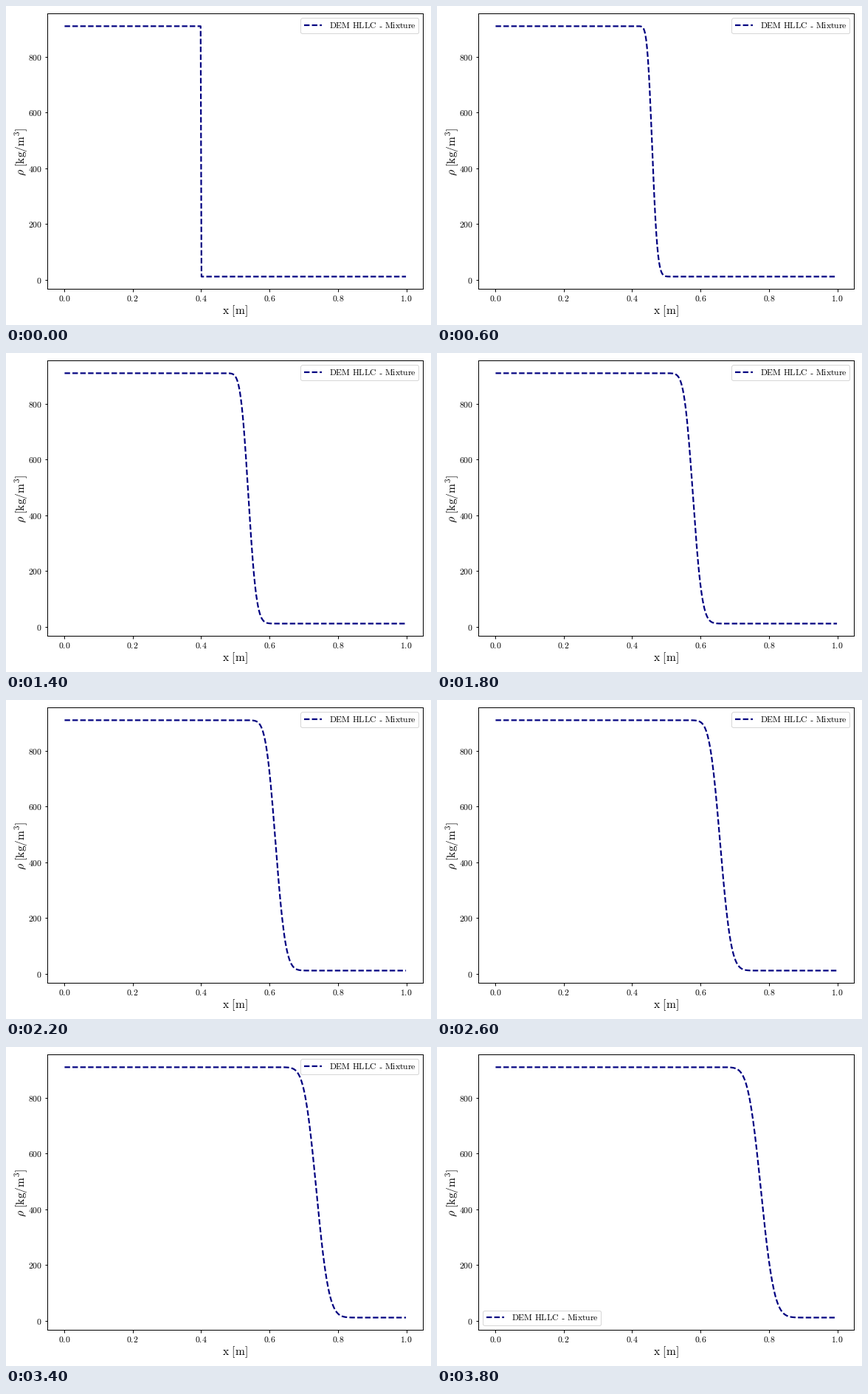
A matplotlib script that plays this animation: 576x432 px, repeating every 4000 ms.

```python
import numpy as np
import matplotlib.pyplot as plt
from matplotlib.animation import FuncAnimation
from matplotlib.lines import Line2D
from matplotlib.patches import FancyBboxPatch
from matplotlib.transforms import Affine2D

W, H, DPI = 576, 432, 72
FRAMES, INTERVAL = 20, 200
CELLS, CFL, STEPS = 400, 0.05, 159
RHO_LEFT, RHO_RIGHT = 910.0, 11.0
SMALL, LARGE = 11.75, 15.6

plt.rcParams.update({
    "mathtext.fontset": "cm",
    "axes.linewidth": 1,
    "xtick.major.width": 1,
    "ytick.major.width": 1,
    "xtick.major.pad": 2.8,
    "ytick.major.pad": 4,
})


def density_profiles():
    """Advect the density jump with a first-order upwind scheme."""
    x = (np.arange(CELLS) + 0.5) / CELLS
    rho = np.where(x < 0.4, RHO_LEFT, RHO_RIGHT)
    profiles = [rho.copy()]
    for _ in range(FRAMES - 1):
        for _ in range(STEPS):
            rho[1:] -= CFL * np.diff(rho)
        profiles.append(rho.copy())
    return x, profiles


def padded(lo, hi):
    pad = 0.05 * (hi - lo)
    return lo - pad, hi + pad


def roman(text):
    return r"$\mathrm{%s}$" % text.replace(" ", r"\ ")


x, profiles = density_profiles()
line_width = 2.2
dashed = dict(color="navy", lw=line_width,
              ls=(0, (7.4 / line_width, 3.2 / line_width)))

fig = plt.figure(figsize=(W / DPI, H / DPI), dpi=DPI, facecolor="white")
left, right, top, bottom = 56.3, 565.2, 10.4, 383.4
ax = fig.add_axes([left / W, 1 - bottom / H, (right - left) / W, (bottom - top) / H])
ax.set_xlim(padded(x[0], x[-1]))
ax.set_ylim(padded(RHO_RIGHT, RHO_LEFT))
xticks = np.arange(6) / 5
yticks = np.arange(0, 801, 200)
ax.set_xticks(xticks, [roman(f"{v:.1f}") for v in xticks], fontsize=SMALL)
ax.set_yticks(yticks, [roman(str(v)) for v in yticks], fontsize=SMALL)
curve, = ax.plot(x, profiles[0], **dashed)

# Overlay in pixel coordinates, y pointing down
page = fig.add_axes([0, 0, 1, 1], zorder=5)
page.set_xlim(0, W)
page.set_ylim(H, 0)
page.axis("off")
page.text(310.2, 413, roman("x [m]"), size=LARGE, ha="center", va="center")
page.text(20.4, 197.3, r"$\rho\ \mathrm{[kg/m^3]}$", size=LARGE,
          rotation=90, ha="center", va="center")

# Legend that can be shifted as a whole
shift = Affine2D()
moved = shift + page.transData
page.add_patch(FancyBboxPatch(
    (399.2, 16.4), 160, 20.6, boxstyle="round,pad=0,rounding_size=2.4",
    fc="white", ec="0.8", lw=1, alpha=0.8, snap=True, transform=moved))
page.add_artist(Line2D([404, 428], [25.8, 25.8], transform=moved, **dashed))
page.add_artist(Line2D([505.6, 508.8], [27.5, 27.5], color="black", lw=0.8,
                       solid_capstyle="butt", transform=moved))
for tx, word in ((438, "DEM HLLC"), (513.4, "Mixture")):
    page.text(tx, 29.8, roman(word), size=SMALL, va="baseline", transform=moved)


def update(i):
    curve.set_ydata(profiles[i])
    shift.clear()
    if i >= 18:
        shift.translate(-336.9, 340.4)
    return curve,


anim = FuncAnimation(fig, update, frames=FRAMES, interval=INTERVAL,
                     repeat=True, repeat_delay=0, blit=False)
plt.show()
```
